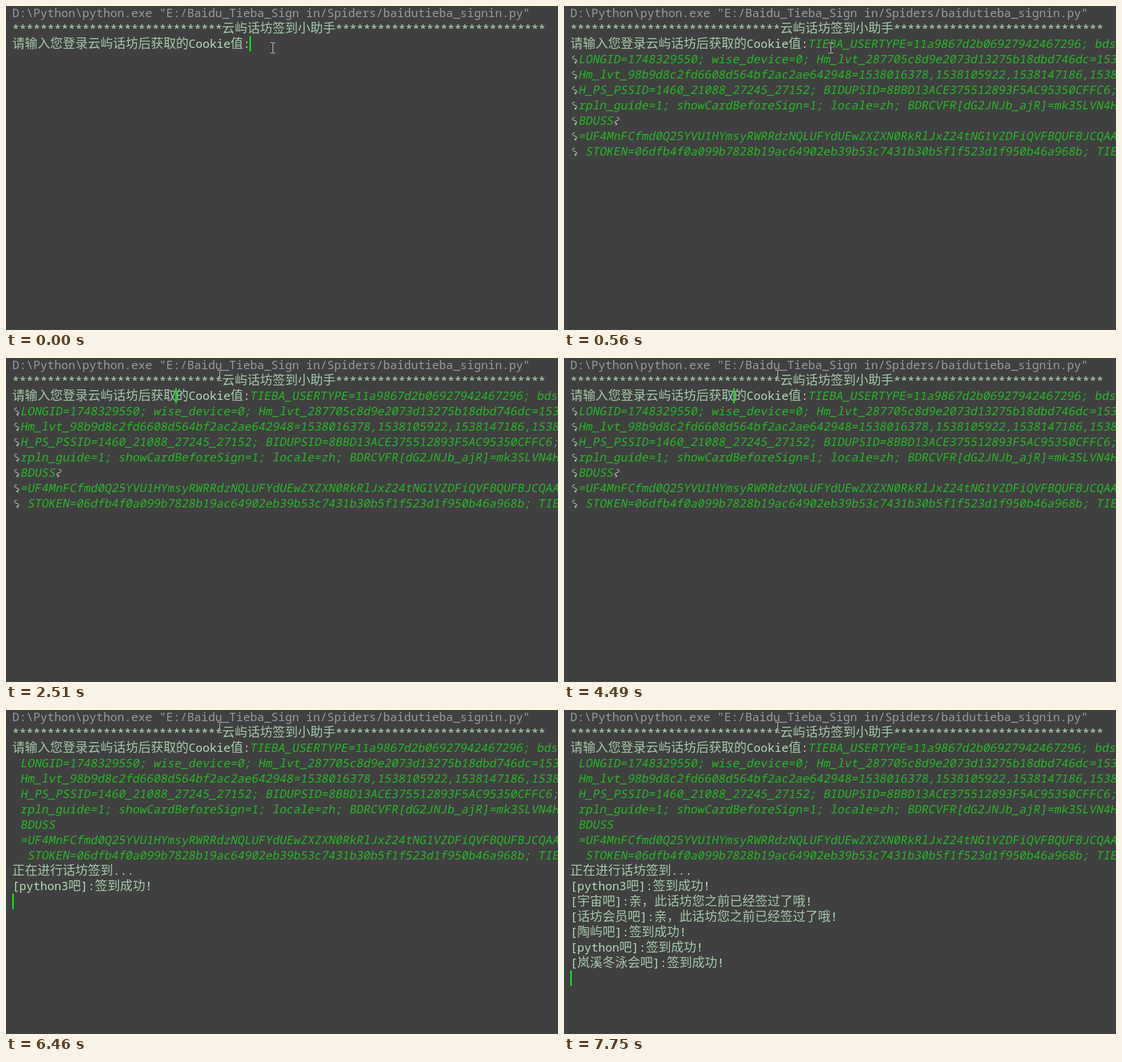
Animation of 789x464 px, one loop 8000 ms. Source, as an HTML page with a canvas:

```html
<!DOCTYPE html>
<html lang="zh">
<head>
<meta charset="utf-8">
<title>Console sign-in</title>
<style>
html, body { margin: 0; width: 100%; height: 100%; overflow: hidden; background: #404040; }
canvas { display: block; }
</style>
</head>
<body>
<canvas id="stage" width="789" height="464"></canvas>
<script>
const ctx = document.getElementById('stage').getContext('2d');
const LOOP = 8000, ROW = 22, LEFT = 9;
const GRAY = '#969a9f', PALE = '#b2dcb8', INPUT = '#24b824', CARET = '#00f514';
const MONO = '16.667px "Noto Sans Mono", monospace';
const HAN = '300 18px "Noto Sans CJK SC", "Noto Sans CJK", sans-serif';
const SLANT = 0.18;

const stars = '*'.repeat(30);
const command = 'D:\\Python\\python.exe "E:/Baidu_Tieba_Sign in/Spiders/baidutieba_signin.py"';
const title = stars + '云屿话坊签到小助手' + stars;
const prompt = '请输入您登录云屿话坊后获取的Cookie值:';
const cookie = [
  'TIEBA_USERTYPE=11a9867d2b06927942467296; bds',
  'LONGID=1748329550; wise_device=0; Hm_lvt_287705c8d9e2073d13275b18dbd746dc=153',
  'Hm_lvt_98b9d8c2fd6608d564bf2ac2ae642948=1538016378,1538105922,1538147186,1538',
  'H_PS_PSSID=1460_21088_27245_27152; BIDUPSID=8BBD13ACE375512893F5AC95350CFFC6;',
  'rpln_guide=1; showCardBeforeSign=1; locale=zh; BDRCVFR[dG2JNJb_ajR]=mk3SLVN4H',
  'BDUSS',
  '=UF4MnFCfmd0Q25YVU1HYmsyRWRRdzNQLUFYdUEwZXZXN0RkRlJxZ24tNG1VZDFiQVFBQUFBJCQAA',
  ' STOKEN=06dfb4f0a099b7828b19ac64902eb39b53c7431b30b5f1f523d1f950b46a968b; TIE'
];
const already = ':亲，此话坊您之前已经签过了哦!';
const output = [
  [6180, '正在进行话坊签到...'],
  [6460, '[python3吧]:签到成功!'],
  [6700, '[宇宙吧]' + already],
  [6950, '[话坊会员吧]' + already],
  [7230, '[陶屿吧]:签到成功!'],
  [7470, '[python吧]:签到成功!'],
  [7750, '[岚溪冬泳会吧]:签到成功!']
];
const PASTE = 560, CLICK = 1220, ENTER = 5160;
const BLINK = 2016, HALF_BLINK = 494;

const rowTop = row => row * ROW - 1;

// Latin cells are 10px wide, Han cells 18px and a little fainter.
function write(text, x, row, color, slant = 0) {
  ctx.save();
  ctx.transform(1, 0, -slant, 1, x - slant * 4, rowTop(row) + 17);
  ctx.fillStyle = color;
  let dx = 0;
  for (const ch of text) {
    const han = ch > '\u2fff';
    ctx.font = han ? HAN : MONO;
    ctx.globalAlpha = han ? 0.88 : 1;
    ctx.fillText(ch, dx, ch === '*' ? 1 : 0);
    dx += han ? 18 : 10;
  }
  ctx.restore();
}

// Soft-wrap hook; flip mirrors it for the end of a line.
function wrapMark(x, row, flip) {
  ctx.save();
  ctx.translate(x + (flip ? 10 : 0), rowTop(row) + 6);
  if (flip) ctx.scale(-1, 1);
  ctx.strokeStyle = '#c4d6c4';
  ctx.stroke(new Path2D('M5.5 .7C2 .2 1 3.5 3.5 4.5L7 5.8C9.5 7 8.5 10 6 10M7.5 7.8L5 10L7.5 11.6'));
  ctx.restore();
}

function caret(x, top) {
  ctx.fillStyle = CARET;
  ctx.fillRect(x, top, 2, ROW);
}

function drawCaret(t) {
  if (t < 90) caret(348, 43);
  else if (t >= CLICK && t < ENTER) {
    if (Math.floor((t - BLINK) / HALF_BLINK) % 2 || t < BLINK) caret(242, 43);
  } else if (t >= ENTER && (t < 5970 || t >= 6180)) {
    const lines = output.filter(([at]) => t >= at).length;
    caret(LEFT, rowTop(10 + lines));
  }
}

// Progress of a move made in n visible jumps from start to end.
function steps(t, start, end, n) {
  if (t < start) return 0;
  const k = Math.min(n, Math.floor((t - start) / (end - start) * (n - 1)) + 1) / n;
  return k * k * (3 - 2 * k);
}

// The I-beam inverts whatever lies under it.
function pointer(t) {
  const a = steps(t, 830, 1070, 8), b = steps(t, CLICK, 1620, 10);
  const x = Math.round(381 - 133 * a + 57 * b);
  const y = Math.round(60 + 4 * Math.sin(Math.PI * a) - 35 * b);
  ctx.globalCompositeOperation = 'difference';
  ctx.fillStyle = '#fff';
  ctx.fillRect(x, y - 7, 1, 14);
  for (const edge of [y - 8, y + 7]) {
    ctx.fillRect(x - 3, edge, 3, 1);
    ctx.fillRect(x + 1, edge, 3, 1);
  }
  ctx.globalCompositeOperation = 'source-over';
}

function draw(t) {
  ctx.fillStyle = '#404040';
  ctx.fillRect(0, 0, 789, 464);
  write(command, LEFT, 0, GRAY);
  write(title, LEFT, 1, PALE);
  write(prompt, LEFT, 2, PALE);
  if (t >= PASTE) {
    cookie.forEach((line, i) => {
      write(line, i ? 21 : 349, 2 + i, INPUT, SLANT);
      if (i && t < ENTER) wrapMark(10, 2 + i);
    });
    if (t < ENTER) wrapMark(71, 7, true);
  }
  output.forEach(([at, line], i) => {
    if (t >= at) write(line, LEFT, 10 + i, PALE);
  });
  drawCaret(t);
  pointer(t);
}

const begin = performance.now();
function tick() {
  draw((performance.now() - begin) % LOOP);
  requestAnimationFrame(tick);
}
tick();
</script>
</body>
</html>
```
